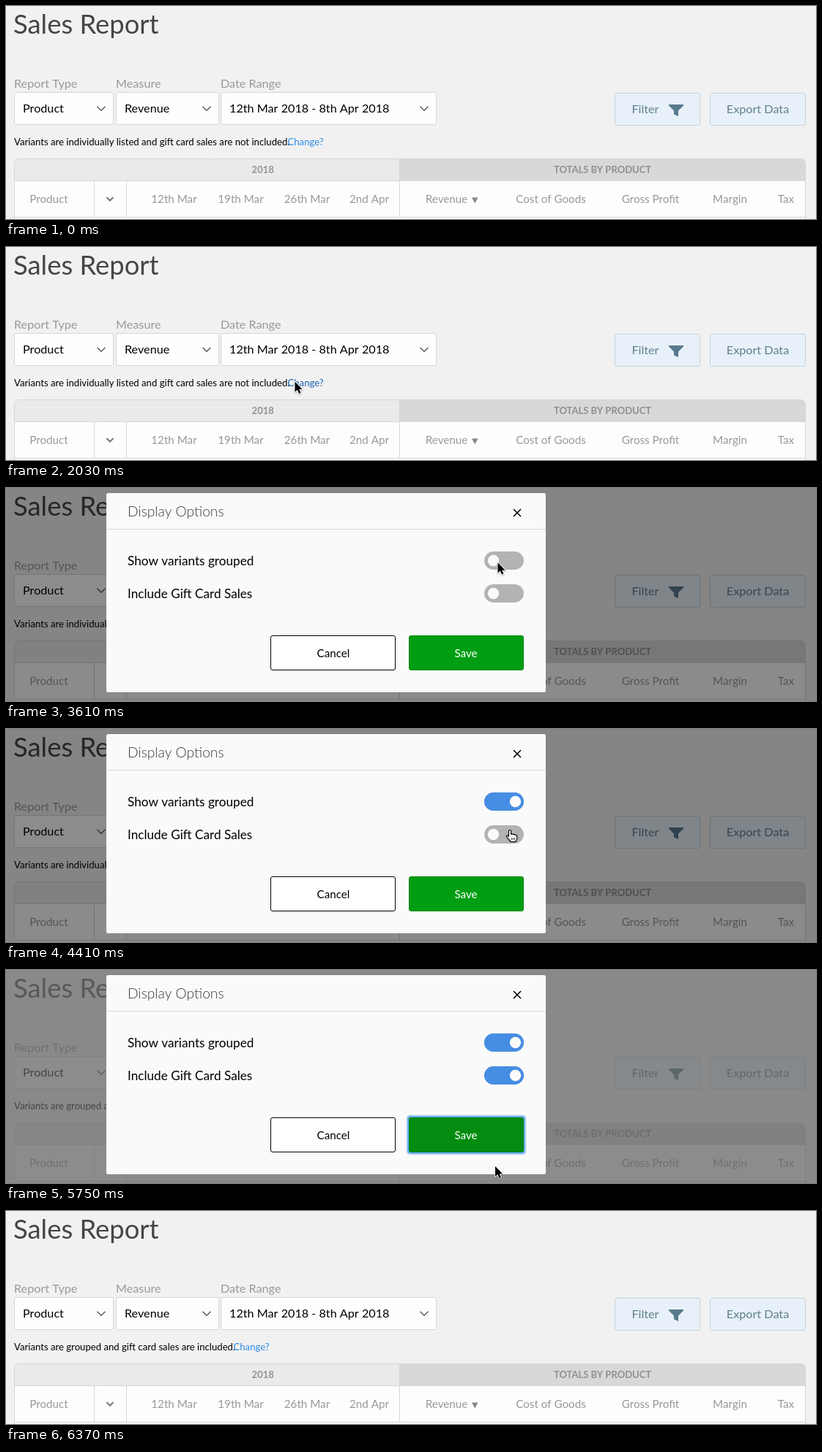
An HTML page with a canvas that plays this animation: 1106 by 292 pixels, repeating every 7.75 s.

```html
<!DOCTYPE html>
<html lang="en">
<head>
<meta charset="utf-8">
<title>Sales Report</title>
<style>
  html, body { margin: 0; width: 100%; height: 100%; overflow: hidden; background: #f1f1f1; }
  canvas { display: block; width: 1106px; height: 292px; }
</style>
</head>
<body>
<canvas id="stage" width="1106" height="292"></canvas>
<script>
const W = 1106, H = 292, LOOP = 7750;
const c = document.getElementById('stage').getContext('2d');

const HAND = new Path2D('M-1.5 1.5Q0-.6 1.5 1.5V6.5q1.5-1.5 3 .3q1.7-1 2.8 .6q2-.6 2.4 1.4v3.4q-.2 1.8-1.5 3v1.3h-7.6v-1q-3-2.8-5.2-6q-.2-2 1.6-1.6l1.5 1.8z');
const KNUCKLES = new Path2D('M2.2 11v3.2M4.4 11v3.2M6.6 11v3.2');
const ARROW = new Path2D('M0 0V14.3L3.3 11.3L5.6 16.4L8 15.4L5.7 10.5H10.2z');

// Pointer stops: time, x, y
const STOPS = [
  [660, 607, 287], [1200, 400, 180], [1410, 395, 186], [1530, 394, 185],
  [2030, 394.5, 184.5], [2300, 395, 184], [2380, 396.5, 183],
  [2860, 396.5, 183], [3630, 672, 102], [3660, 684, 103],
  [4100, 684, 103], [4410, 688, 138], [4520, 688, 141],
  [4930, 688, 141], [5280, 657, 225], [5719, 657, 225], [5720, 668, 269]
];

const clamp = v => Math.max(0, Math.min(1, v));
const ease = v => v * v * (3 - 2 * v);
const progress = (t, start, length) => ease(clamp((t - start) / length));
const within = (t, a, b) => t >= a && t < b;

function text(str, x, y, size, color, align = 'left', weight = 400) {
  c.font = `${weight} ${size}px Lato, sans-serif`;
  c.textAlign = align;
  c.fillStyle = color;
  c.fillText(str, x, y);
}

function rect(x, y, w, h, color) {
  c.fillStyle = color;
  c.fillRect(x, y, w, h);
}

function box(x, y, w, h, r, fill, stroke) {
  c.beginPath();
  c.roundRect(x, y, w, h, r);
  if (fill) { c.fillStyle = fill; c.fill(); }
  if (stroke) { c.strokeStyle = stroke; c.lineWidth = 1; c.stroke(); }
}

function line(points, color, width) {
  c.beginPath();
  points.forEach(([x, y]) => c.lineTo(x, y));
  c.strokeStyle = color;
  c.lineWidth = width;
  c.stroke();
}

function chevron(x, y, r, color, width) {
  line([[x - r, y - r / 2], [x, y + r / 2], [x + r, y - r / 2]], color, width);
}

function shape(points, color) {
  c.beginPath();
  points.forEach(([x, y]) => c.lineTo(x, y));
  c.fillStyle = color;
  c.fill();
}

function select(label, value, x, w) {
  text(label, x, 112, 16.2, '#999');
  box(x + .5, 118.5, w - 1, 44, 2.5, '#fefefe', '#d6d6d6');
  text(value, x + 12, 146, 16.2, '#000');
  chevron(x + w - 17, 140.5, 5.5, '#555', 1.3);
}

function table() {
  box(11.5, 209.5, 1080, 100, 6, '#fdfdfd', '#d4d4d4');
  c.save();
  c.beginPath();
  c.roundRect(12, 210, 1079, 100, 5);
  c.clip();
  rect(12, 210, 525, 29, '#eaeaea');
  rect(537, 210, 555, 29, '#d8d8d8');
  rect(12, 239, 1080, 1, '#d6d6d6');
  rect(12, 289, 1080, 1, '#d6d6d6');
  [120, 164, 537].forEach(x => rect(x, 240, 1, 49, '#d6d6d6'));
  c.restore();

  text('2018', 350.7, 229, 13, '#929292', 'center', 700);
  text('TOTALS BY PRODUCT', 814.5, 229, 13, '#909090', 'center', 700);
  const heads = [
    ['Product', 58.5], ['12th Mar', 229.5], ['19th Mar', 320.5], ['26th Mar', 411],
    ['2nd Apr', 496], ['Revenue', 601.5], ['Cost of Goods', 744],
    ['Gross Profit', 880], ['Margin', 988.5], ['Tax', 1065]
  ];
  heads.forEach(([label, x]) => text(label, x, 270, 15.2, '#999', 'center'));
  chevron(142, 264.5, 4.5, '#777', 2);
  shape([[636, 262.5], [644.5, 262.5], [640.2, 270.5]], '#888');
}

function page(t) {
  const saved = t >= 5720;
  rect(0, 0, W, H, '#f1f1f1');
  text('Sales Report', 10, 38, 36.4, '#454545');
  select('Report Type', 'Product', 11, 136);
  select('Measure', 'Revenue', 150, 141);
  select('Date Range', '12th Mar 2018 - 8th Apr 2018', 293, 295);

  box(831.5, 119.5, 116, 44, 2, '#e8f1f9', '#c3d2dc');
  text('Filter', 873, 147, 16.2, '#607e8f', 'center');
  shape([[905, 135], [925, 135], [925, 136.5], [918, 143.5], [918, 151], [912, 148.5], [912, 143.5], [905, 136.5]], '#587a8d');
  box(961.5, 119.5, 130, 44, 2, '#e8f1f9', '#c3d2dc');
  text('Export Data', 1026.5, 147, 16.2, '#607e8f', 'center');

  const note = saved
    ? 'Variants are grouped and gift card sales are included.'
    : 'Variants are individually listed and gift card sales are not included.';
  text(note, 11, 191, 13.15, '#000');
  text('Change?', saved ? 310.5 : 384.5, 191, 13.15, within(t, 1350, 5720) ? '#1c62ad' : '#2b8ce6');
  table();

  // Content is dimmed while the report reloads
  if (within(t, 5720, 6370)) {
    c.globalAlpha = .5;
    rect(0, 0, W, H, '#f1f1f1');
    c.globalAlpha = 1;
  }
}

function toggle(y, on) {
  box(653, y, 54, 25, 12.5, '#b3b3b3');
  c.globalAlpha *= on;
  box(653, y, 54, 25, 12.5, '#468de4');
  c.globalAlpha = modalAlpha;
  c.beginPath();
  c.arc(665.5 + 30 * on, y + 12.5, 7.7, 0, 7);
  c.fillStyle = '#fafafa';
  c.fill();
}

let modalAlpha = 1;

function modal(t) {
  modalAlpha = t < 5810 ? 1 : t < 5840 ? .5 : .15;
  c.globalAlpha = modalAlpha;
  box(137, 7, 600, 273, 2.5, '#fafafa');
  text('Display Options', 166, 39, 19.2, '#3c3c3c', 'left', 300);
  rect(137, 56, 600, 1, '#d9d9d9');
  line([[693, 29], [703, 39]], '#000', 1.6);
  line([[703, 29], [693, 39]], '#000', 1.6);

  text('Show variants grouped', 166, 106, 17.2, '#000');
  text('Include Gift Card Sales', 166, 151, 17.2, '#000');
  toggle(87, progress(t, 3880, 230));
  toggle(132, progress(t, 4700, 230));

  box(361.5, 202.5, 170, 47, 2.5, '#fff', '#000');
  text('Cancel', 447, 232, 15.2, '#000', 'center');
  const pressed = t >= 5420;
  if (pressed) {
    box(546.5, 198.5, 164, 55, 5, '#c3dcf8');
    box(548, 200, 161, 52, 4, '#6dadf2');
  }
  box(550.5, 202.5, 156, 47, 2.5, pressed ? '#038c10' : '#019d13', pressed ? '#037d0e' : '#048a12');
  text('Save', 628, 232, 15.2, '#fff', 'center');
  c.globalAlpha = 1;
}

function pointerAt(t) {
  let i = 0;
  while (i < STOPS.length - 1 && STOPS[i + 1][0] <= t) i++;
  const [t0, x0, y0] = STOPS[i];
  const [t1, x1, y1] = STOPS[i + 1] || [t0 + 1, x0, y0];
  const k = progress(t, t0, t1 - t0);
  return [x0 + (x1 - x0) * k, y0 + (y1 - y0) * k];
}

function pointer(t) {
  if (!within(t, 660, 5840)) return;
  const hand = within(t, 1350, 2030) || within(t, 3660, 5720);
  const [x, y] = pointerAt(t);
  c.save();
  c.translate(x, y);
  c.lineJoin = 'round';
  c.shadowColor = 'rgba(0,0,0,.3)';
  c.shadowBlur = 2;
  c.shadowOffsetY = 1;
  c.fillStyle = c.strokeStyle = hand ? '#fff' : '#000';
  if (hand) {
    c.fill(HAND);
    c.shadowColor = 'transparent';
    c.strokeStyle = '#000';
    c.lineWidth = 1.1;
    c.stroke(HAND);
    c.lineWidth = .8;
    c.stroke(KNUCKLES);
  } else {
    c.strokeStyle = '#fff';
    c.lineWidth = 1.8;
    c.stroke(ARROW);
    c.shadowColor = 'transparent';
    c.fill(ARROW);
  }
  c.restore();
}

function draw(t) {
  page(t);
  if (within(t, 2060, 5950)) rect(0, 0, W, H, `rgba(0,0,0,${t < 5720 ? .45 : .435})`);
  if (within(t, 2060, 5890)) modal(t);
  pointer(t);
}

const start = performance.now();
function tick() {
  draw((performance.now() - start) % LOOP);
  requestAnimationFrame(tick);
}
tick();
</script>
</body>
</html>
```
